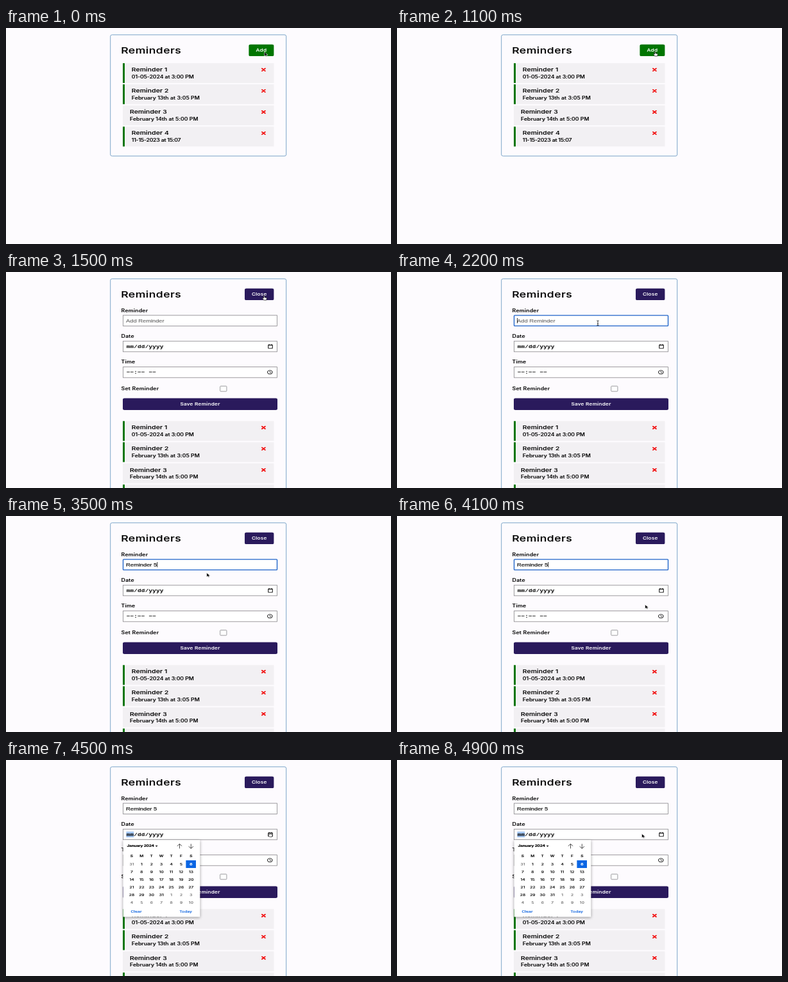
An HTML page that plays this animation: 600 by 338 pixels, repeating every 5 s.

```html
<!DOCTYPE html>
<html lang="en">
<head>
<meta charset="utf-8">
<title>Reminders</title>
<style>
  html, body { margin: 0; width: 100%; height: 100%; overflow: hidden; background: #fdfbfe; }
  svg { display: block; width: 600px; height: 338px; }
  text { font-family: Inter, "Open Sans", sans-serif; white-space: pre; stroke-width: .14px; }
  .field { font-family: "Liberation Sans", Arial, sans-serif; }
  .mono { font-family: "Liberation Mono", monospace; font-weight: 700; letter-spacing: .13px; stroke: none; }
  .popup { filter: drop-shadow(0 1.5px 2px #0006); }
</style>
</head>
<body>
<svg id="stage" viewBox="0 0 600 338"></svg>
<script>
const LOOP = 5000, STEP = 100;
const WIDE = 1.28; // the whole page is shown wider than tall
const INDIGO = '#2a1a5c', GREEN = '#007500', BLUE = '#1c62c8', GREY = '#858488';
const stage = document.getElementById('stage');

// y is the middle of the line
function text(x, y, size, str, { fill = '#000', weight = 450, gap = 0, anchor = 'start', cls = '' } = {}) {
  return `<text class="${cls}" transform="translate(${x} ${y + size * .35}) scale(${WIDE} 1)" font-size="${size}"
    fill="${fill}" stroke="${fill}" font-weight="${weight}" text-anchor="${anchor}" style="${gap ? `letter-spacing:${gap}em` : ''}">${str}</text>`;
}
const rect = (x, y, w, h, fill, more = '') =>
  `<rect x="${x}" y="${y}" width="${w}" height="${h}" fill="${fill}" ${more}/>`;
const wide = (x, y, body) => `<g transform="translate(${x} ${y}) scale(${WIDE} 1)">${body}</g>`;

function button(x, y, w, label, fill, scale = 1) {
  const cx = x + w / 2, cy = y + 9.15;
  return `<g transform="translate(${cx} ${cy}) scale(${scale}) translate(${-cx} ${-cy})">`
    + rect(x, y, w, 18.3, fill, 'rx="2.7" ry="2.2"')
    + text(cx, cy, 6.45, label, { fill: '#fff', anchor: 'middle', gap: .03 }) + '</g>';
}

const tasks = [
  ['01-05-2024 at 3:00 PM', true, -.01],
  ['February 13th at 3:05 PM', true, .002],
  ['February 14th at 5:00 PM', false, .002],
  ['11-15-2023 at 15:07', true, -.028],
];
function taskList(top) {
  return tasks.map(([when, on, gap], i) => {
    const y = top + i * 33.1, x = on ? 195.8 : 193;
    return rect(182, y, 235.5, 31, '#f2f0f3')
      + (on ? rect(182, y, 3, 31, GREEN) : '')
      + text(x, y + 10.2, 8.05, 'Reminder ' + (i + 1), { weight: 500, gap: .018 })
      + text(x, y + 21.4, 6.9, when, { gap })
      + wide(401.4, y + 10.2, '<path d="M-1.9-1.9 1.9 1.9M1.9-1.9-1.9 1.9" stroke="#f20d0d" stroke-width="1.6" stroke-linecap="round"/>');
  }).join('');
}

function input(y, focus) {
  return rect(182.5, y, 240, 16.6, '#fff',
    focus ? `rx="1" stroke="${BLUE}" stroke-width="1.35"` : `stroke="${GREY}" stroke-width=".8"`);
}
const label = (y, str) => text(179.6, y, 6.9, str, { gap: .022 });

function form(s) {
  const typed = s >= 31;
  const caret = s >= 22 && s < 27 ? 187.2 : (s >= 31 && s < 36) || (s >= 41 && s < 43) ? 235.4 : 0;
  return label(60.2, 'Reminder') + label(100.5, 'Date') + label(140.9, 'Time') + label(182.5, 'Set Reminder')
    + input(67.8, s >= 22 && s < 43) + input(108.2, s >= 43 && s < 45) + input(148.6)
    + text(187, 76.2, 7.3, typed ? 'Reminder 5' : 'Add Reminder', { cls: 'field', weight: 400, fill: typed ? '#000' : '#6c6c6c' })
    + (caret ? rect(caret, 72, .8, 8.2, '#000') : '')
    + (s >= 43 ? rect(187.4, 112, 11.8, 9, '#a5c8f5') : '')
    + text(187.8, 116.5, 7.3, 'mm/dd/yyyy', { cls: 'mono' })
    + text(187.8, 156.8, 7.3, '−−:−− −−', { cls: 'mono' })
    + wide(412, 116.5, '<path d="M-2.5-2.4h5v5.2h-5zM-2.5-1.9h5M-1.5-3.4v1M1.5-3.4v1" fill="none" stroke="#111" stroke-width=".85"/>')
    + wide(411.3, 156.8, '<path d="M0-2V.2L1.5 1.1" fill="none" stroke="#111" stroke-width=".7"/><circle r="2.9" fill="none" stroke="#111" stroke-width=".8"/>')
    + rect(333.7, 178.6, 10.2, 8.2, '#fff', `rx="1" stroke="${GREY}" stroke-width=".8"`)
    + button(182, 197.6, 241, 'Save Reminder', INDIGO);
}

function calendar() {
  const col = i => 196 + (i % 7) * 15.4;
  const mid = { anchor: 'middle' };
  let out = rect(182.5, 125.2, 119.8, 120.3, '#fff', 'class="popup"')
    + text(188.5, 134.6, 5.1, 'January 2024', { weight: 650, gap: -.03 })
    + '<path d="M232.6 133.8h4l-2 2.2z" fill="#111"/>'
    + '<path d="M270.5 138.5v-7M266.8 134.6l3.7-3.2 3.7 3.2M288.3 131.3v7M284.6 135.2l3.7 3.2 3.7-3.2" fill="none" stroke="#222" stroke-width=".8"/>';
  [...'SMTWTFS'].forEach((d, i) => out += text(col(i), 150.6, 5.2, d, mid));
  out += rect(280.4, 157, 15.6, 12, '#0b66e4');
  for (let i = 0; i < 42; i++) {
    const day = (i + 30) % 31 + 1, now = i === 6, inside = i > 0 && i < 32;
    out += text(col(i), 163.1 + Math.floor(i / 7) * 12, 5.2, day,
      { ...mid, fill: now ? '#fff' : inside ? '#111' : '#777', weight: now ? 700 : 450 });
  }
  return out + text(194.4, 237, 5.3, 'Clear', { fill: '#1a6be0' }) + text(290, 237, 5.3, 'Today', { fill: '#1a6be0', anchor: 'end' });
}

const pointers = {
  arrow: '<path d="M0 0V6.3L1.4 5 2.3 7 3.3 6.6 2.4 4.7H4.3Z" fill="#000" stroke="#fff" stroke-width=".5"/>',
  hand: '<path d="M-.6 4V.6a.6.6 0 0 1 1.2 0V2.8l2.2.5c.5.1.6.5.5 1L2.8 7H-.3L-2 4.7c-.3-.6.4-1 .8-.6z" fill="#fff" stroke="#000" stroke-width=".6"/>',
  beam: '<path d="M-1.3-3.9Q0-3.9 0-3V3Q0 3.9-1.3 3.9M1.3-3.9Q0-3.9 0-3M0 3Q0 3.9 1.3 3.9M-.7 1H.7" fill="none" stroke="#111" stroke-width=".7"/>',
};
// step, x, y, shape
const route = [
  [0, 402.6, 37.5, 'arrow'], [1, 402.2, 37, 'hand'], [15, 402.2, 37, 'hand'], [16, 395, 43, 'arrow'],
  [19, 313, 77, 'arrow'], [20, 313, 80, 'beam'], [34, 313, 80, 'beam'], [35, 312.8, 89, 'arrow'],
  [38, 330, 201, 'hand'], [39, 338, 190, 'arrow'], [42, 411, 113.2, 'hand'], [46, 411, 113.2, 'hand'],
  [47, 403, 115, 'arrow'], [49, 381.5, 115.5, 'arrow'],
];
function pointer(s) {
  const i = route.findLastIndex(k => k[0] <= s);
  const a = route[i], b = route[i + 1] || a;
  const p = b === a ? 0 : (s - a[0]) / (b[0] - a[0]);
  return wide(a[1] + (b[1] - a[1]) * p, a[2] + (b[2] - a[2]) * p, pointers[a[3]]);
}

function draw(s) {
  const open = s >= 15;
  stage.innerHTML = rect(162.7, 10.7, 274, open ? 400 : 189.6, 'none', 'rx="2.7" ry="2.2" stroke="#4682b4" stroke-width=".7"')
    + text(179.2, 35, 13.76, 'Reminders', { weight: 500, gap: .028 })
    + (open ? button(372, 25.8, 45.4, 'Close', INDIGO) + form(s)
            : button(378.4, 25.8, 39, 'Add', GREEN, s === 14 ? .97 : 1))
    + taskList(open ? 233.3 : 55.1)
    + (s >= 45 ? calendar() : '')
    + pointer(s);
}

let last = -1;
function tick() {
  const s = Math.floor(performance.now() % LOOP / STEP);
  if (s !== last) draw(last = s);
  requestAnimationFrame(tick);
}
tick();
</script>
</body>
</html>
```
